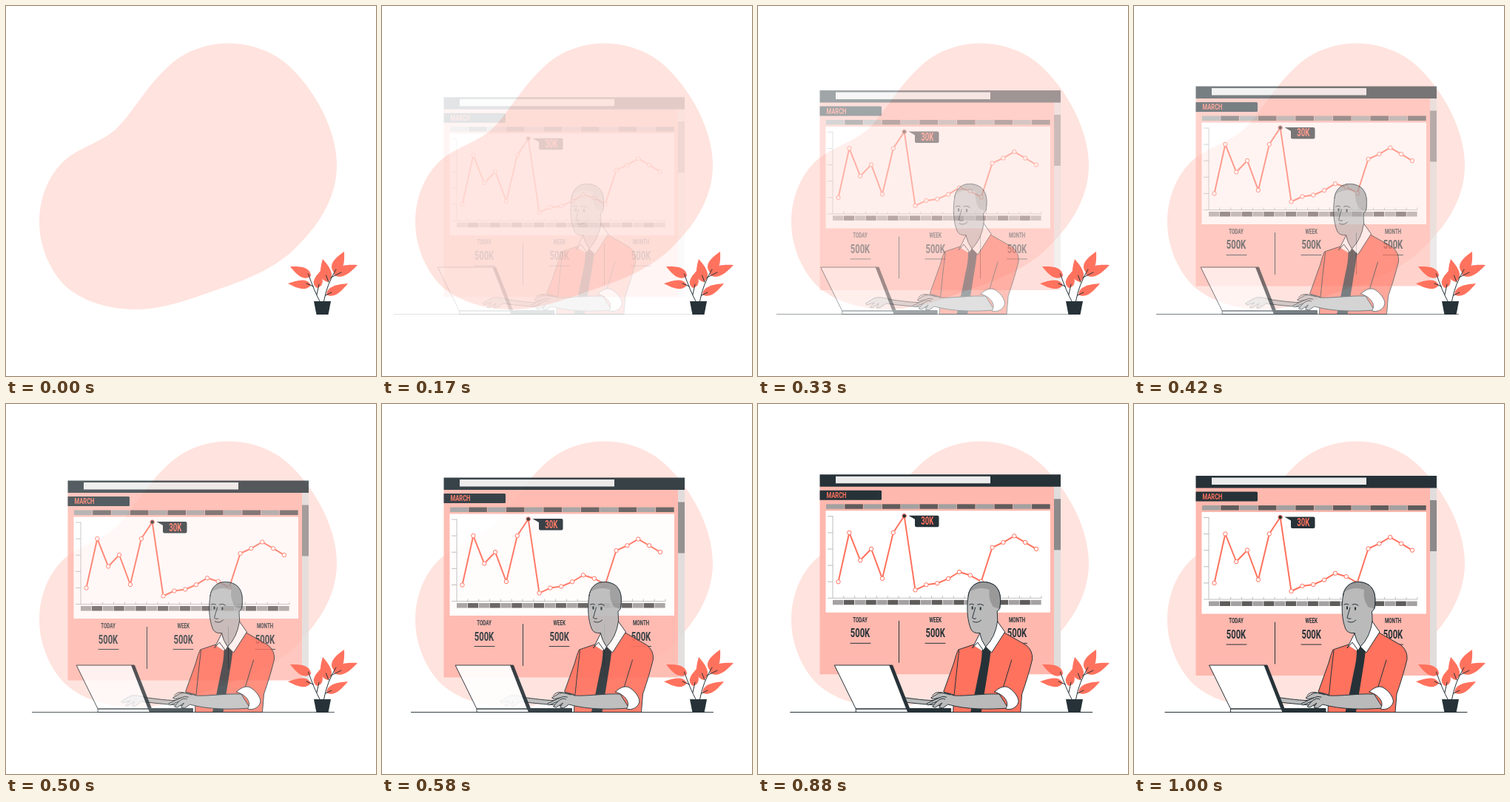
An HTML page for the animation above (1040 ms loop, 500x500 px).

```html
<!DOCTYPE html>
<html lang="en">
<head>
<meta charset="utf-8">
<title>Monthly report</title>
<style>
  html, body { margin: 0; width: 100%; height: 100%; overflow: hidden; background: #fff; }
  svg { display: block; width: 100%; height: 100%; }
  text { font-family: Roboto, "Liberation Sans", sans-serif; font-weight: 600; text-anchor: middle; }
  .ink { fill: #263238; }
  .coral { fill: #ff725e; }
  .skin { fill: #bababa; }
  .white { fill: #fff; }
  .line { stroke: #263238; stroke-width: 1; stroke-linejoin: round; stroke-linecap: round; }
  .open { fill: none; }
</style>
</head>
<body>
<svg viewBox="0 0 500 500">
  <path fill="#ffe3de" d="M300 50.500C330 50.500 358 60 380 79C415 110 447 165 447 215C447 262 420 300 385 333C350 364 300 378 255 394C225 404 200 410 175 410C145 410 108 402 82 380C60 360 45 325 45 292C45 262 56 229 80 208C101 190 130 184 150 165C172 143 190 108 220 81C242 61 270 50.500 300 50.500Z"/>

  <g id="screen">
    <path fill="#ffb8ae" d="M83.500 113H400V367H83.500Z"/>
    <path fill="#e0dddc" d="M400 113H409V367H400Z"/>
    <path fill="#8c8a8a" d="M400 130H409V199H400Z"/>
    <path class="ink" d="M83.500 97H409V113.500H83.500Z"/>
    <path fill="#ebebeb" d="M105 99.500H314V109H105Z"/>
    <path class="ink" d="M83.500 118.500H165.500Q167 118.500 167 120V130Q167 131.500 165.500 131.500H83.500Z"/>
    <path class="white" d="M91.500 146H395V283.500H91.500Z"/>
    <g id="bars"></g>
    <path id="axes" class="open" stroke="#b5b5b5" stroke-width=".9"/>
    <g id="chart"></g>
    <path class="ink" d="M203.500 152.500H242.500Q244.500 152.500 244.500 154.500V166Q244.500 168 242.500 168H214Q212 168 212 166V157.500Z"/>
    <path class="line open" d="M190.500 295V351M300.500 295V351M125 325H152M226 325H253M336.500 325H363.500"/>
    <g id="labels"></g>
  </g>

  <g id="table"><path class="line" d="M42 416.500H450"/></g>

  <g id="person">
    <path class="skin line" d="M250 400C232 402 214 399 198 397C186 394 178 392 172 396L162 402L164 404L174 401L168 407L171 408L180 402L177 408L181 408L190 402C210 405 230 406 250 408Z"/>
    <path class="coral line" d="M290 325L269 332Q266 338 263 350L249 389L263 393L262 416.500H353L355 392Q364 366 369 345Q370 334 361 326L331 309Z"/>
    <path class="white" d="M298 311L305 317L323 297L329 309L314 334H302L291 327Z"/>
    <path class="ink" d="M302 331L306 328L313 333Q311 350 308.500 364L300 416.500H285.500Q292 388 297 362Q301 346 301 333Z"/>
    <path class="skin line" d="M282.500 259C280 275 281 292 286 304Q289 310.500 298 309.500L299 318Q301 326 306 328Q318 317 322.500 302L321.500 280Q324 279 325 276C327 262 326 252 318 245C304 236 285 240 282.500 259Z"/>
    <path fill="#999" d="M284 254C287 239 305 238 317 245C326 252 327 264 324.500 277L316 274Q309 263 311 251Q297 246 284 254Z"/>
    <path class="line open" d="M282.500 259C285 240 304 236 318 245C326 252 327 262 325 276M284 271Q287 269 290 271M295 271Q299 269 303 272M292 275L288 289Q290 291 293 290M289 294Q295 297 300 292"/>
    <path class="white line" d="M298 310L288 330L295 322L303 333L306 328Q300 320 298 310ZM322 294L332 308L314 336L306 328Q319 315 322 294Z"/>
    <path class="ink" d="M287 273.500h2v4h-2zM298 274.500h2v4h-2z"/>
    <path class="line open" d="M270 333Q266 366 263.500 393M341 346L330 382"/>
    <path class="skin line" d="M324 392C304 391 280 395 263 394Q252 389 242 391L232 397L235 399L243 397L226 405L228 407L240 402L234 409L238 410L247 404L243 410L248 411L255 406C280 413 310 413 336 411Z"/>
    <path class="line open" d="M243 397Q248 394 253 396M240 402Q247 396 251 399M234 394Q238 388 247 390L258 393"/>
    <path class="white line" d="M318 389C325 382 333 380 338 384C346 389 352 399 350 404C347 411 340 414 333 412C339 403 331 393 318 389Z"/>
  </g>

  <g id="laptop">
    <path class="ink line" d="M176 353H180L203 411.500H259V416.500H199Z"/>
    <path class="white line" d="M102 353H176L199 412H131ZM131 412H199L201 416.500H131Z"/>
  </g>

  <g id="plant">
    <g id="leaves" class="coral"></g>
    <path class="line open" d="M424 399Q416 384 408.500 362M415.500 379L406 375M420 390L423 376M429.500 399Q434 375 446 356M436 373L432.500 364M439 367L453 360M432 391L440 387"/>
    <path class="ink" d="M416 399H439L435.500 417H419.500Z"/>
  </g>
</svg>
<script>
const byId = id => document.getElementById(id);

function add(parent, tag, attrs, text) {
  const el = document.createElementNS("http://www.w3.org/2000/svg", tag);
  for (const key in attrs) el.setAttribute(key, attrs[key]);
  if (text) el.textContent = text;
  byId(parent).append(el);
}

// Each leaf: tip, base and half-width.
const leaves = [
  [384, 352, 412, 365, 9], [381, 375, 412, 377, 8], [428, 342, 435, 373, 10],
  [425, 358, 420, 381, 8], [457, 332, 443, 360, 10], [475, 350, 443, 363, 9],
  [462, 375, 433, 390, 8]
];
for (const [x, y, bx, by, w] of leaves) {
  const dx = bx - x, dy = by - y, len = Math.hypot(dx, dy);
  const at = (along, side) => `${x + dx * along - dy / len * side} ${y + dy * along + dx / len * side}`;
  add("leaves", "path", {
    d: `M${x} ${y}C${at(.35, w * .6)} ${at(.8, w * 1.3)} ${bx} ${by}C${at(.8, -w * 1.3)} ${at(.35, -w * .6)} ${x} ${y}Z`
  });
}

function barRow(x, y, height, count, pitch) {
  for (let i = 0; i < count; i++) {
    add("bars", "rect", { x: x + i * pitch, y, width: pitch - .7, height, fill: i % 2 ? "#5f5c5c" : "#a3a1a1" });
  }
}
barRow(92, 137, 6.5, 12, 25.28);
barRow(101, 266.5, 6.5, 19, 14.86);

let axes = "M101 153V264H383";
for (let i = 0; i < 6; i++) axes += `M94 ${153.5 + i * 22.1}h7`;
for (let i = 1; i < 20; i++) axes += `M${101 + i * 14.84} 264v-3`;
byId("axes").setAttribute("d", axes);

const values = [242, 175.5, 213, 197.5, 237.5, 175.5, 153, 253, 246, 244,
  237.7, 228.7, 233.2, 241.5, 195.5, 188.7, 180, 188.7, 197.6];
const points = values.map((y, i) => [108.5 + i * 14.86, y]);
add("chart", "polyline", { points: points.join(" "), fill: "none", stroke: "#ff725e", "stroke-width": 2, "stroke-linejoin": "round" });
points.forEach(([cx, cy], i) => {
  add("chart", "circle", { cx, cy, r: 2.7, fill: i === 6 ? "#263238" : "#fff", stroke: "#ff725e" });
});

// One condensed style for all lettering.
function label(text, x, y, size, color = "#263238") {
  add("labels", "text", { transform: `translate(${x} ${y}) scale(.69 1)`, "font-size": size, fill: color }, text);
}
label("MARCH", 106, 128.8, 11, "#ff725e");
label("30K", 228.8, 165, 14, "#ff725e");
[["TODAY", 138], ["WEEK", 239.7], ["MONTH", 350]].forEach(([name, x]) => {
  label(name, x, 296.3, 9);
  label("500K", x, 317, 16.3);
});

const LOOP = 1040, FPS = 24, TRAVEL = 30;

const cubic = (a, b, s) => 3 * (1 - s) ** 2 * s * a + 3 * (1 - s) * s * s * b + s ** 3;

// Ease with a small overshoot near the end.
function ease(x) {
  if (x >= 1) return 1;
  let low = 0, high = 1;
  for (let i = 0; i < 30; i++) {
    const mid = (low + high) / 2;
    if (cubic(.36, .5, mid) < x) low = mid; else high = mid;
  }
  return cubic(-.01, 1.38, low);
}

function draw(time) {
  // Steps begin on whole hundredths of a second.
  const ticks = Math.floor((time % LOOP) / 10) * 10 + 5;
  const step = Math.ceil(ticks * FPS / 1000) - 1;
  const p = step < 2 ? 0 : ease((step + .5) / FPS);
  const shift = TRAVEL * (1 - p);
  for (const id of ["screen", "table", "person", "laptop"]) {
    const el = byId(id);
    el.setAttribute("opacity", Math.min(1, Math.max(0, p)));
    el.setAttribute("transform", id === "screen" ? `translate(0 ${shift})` : `translate(${-shift} 0)`);
  }
}

const start = performance.now();
function tick() {
  draw(performance.now() - start);
  requestAnimationFrame(tick);
}
tick();
</script>
</body>
</html>
```
